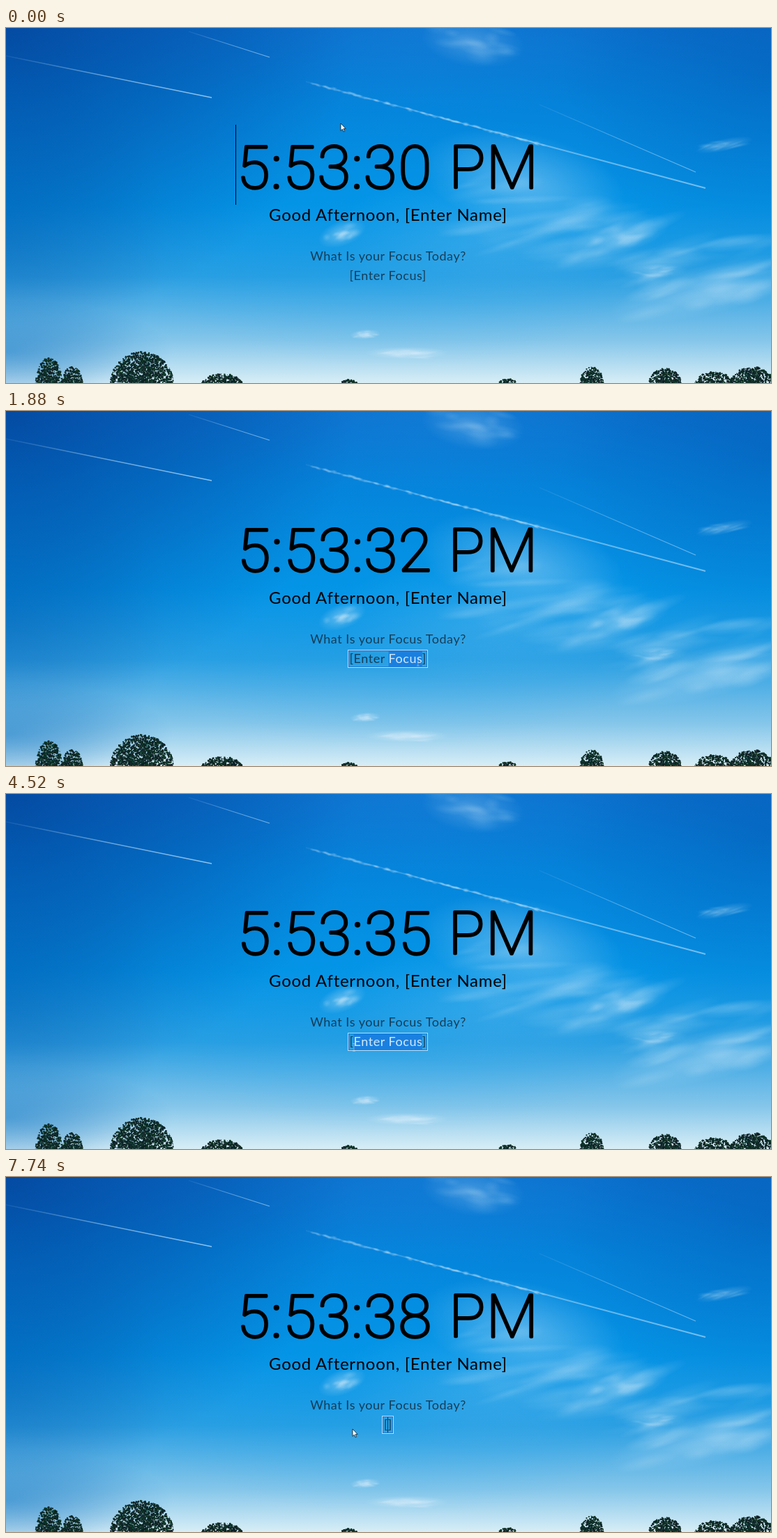
Animation, 1097 px wide and 510 px high, one loop 8 s. Source, as an HTML page with a canvas:

```html
<!DOCTYPE html>
<html lang="en">
<head>
<meta charset="utf-8">
<title>Focus clock</title>
<style>
  html, body { margin: 0; width: 100%; height: 100%; overflow: hidden; background: #0a7fd6; }
  canvas, svg { position: absolute; left: 0; top: 0; width: 1097px; height: 510px; }
  text { text-anchor: middle; font-family: Lato, "Open Sans", sans-serif; letter-spacing: .03em; white-space: pre; }
  #clock {
    font: 100 86px Roboto, Inter, sans-serif; font-variant-numeric: proportional-nums; letter-spacing: 2px;
    stroke: #000; stroke-width: 3.5px; stroke-linejoin: round;
  }
  #hello { font-size: 24px; }
  .small { font-size: 18px; fill: rgba(18, 30, 42, .76); }
  .picked { fill: #d3e8fa; }
</style>
</head>
<body>
<canvas id="sky" width="1097" height="510"></canvas>
<svg viewBox="0 0 1097 510">
  <text id="clock" x="548" y="229.5"></text>
  <rect id="clockCaret" y="139" width="1" height="115"/>
  <text id="hello" x="548" y="277">Good Afternoon, [Enter Name]</text>
  <text class="small" x="548" y="334">What Is your Focus Today?</text>
  <g id="ring" fill="none">
    <rect id="outer" y="343.5" height="25" stroke="#d5eafa" stroke-opacity=".85"/>
    <rect id="inner" y="344.5" height="23" stroke="#1670cf" stroke-opacity=".8"/>
  </g>
  <rect id="mark" y="345" height="22.5" fill="#1a80e0"/>
  <text id="focus" class="small" x="547.7" y="362"><tspan></tspan><tspan class="picked"></tspan><tspan></tspan></text>
  <rect id="caret" y="345" width="1" height="22" fill="#12324e"/>
  <circle id="click" r="9" fill="#cfdc32" fill-opacity=".8"/>
  <path id="beam" d="M-2-5.5h4M0-5.5v11M-2 5.5h4" fill="none" stroke="#d9cfc4" stroke-opacity=".5"/>
  <path id="arrow" d="M0 0V10.5L2.4 8.3 4 12 5.6 11.3 4 7.7H7.2Z" fill="#fff" stroke="#111" stroke-width=".8"/>
</svg>
<script>
const $ = id => document.getElementById(id);
const set = (el, attrs) => { for (const k in attrs) el.setAttribute(k, attrs[k]); };
const show = (el, on) => { el.style.display = on ? '' : 'none'; };
const clamp = (v, lo, hi) => Math.min(hi, Math.max(lo, v));

// ---- backdrop ----
const ctx = $('sky').getContext('2d');
let seed = 7;
const rnd = () => (seed = (seed * 16807) % 2147483647) / 2147483647;
const between = (a, b) => a + (b - a) * rnd();
const spread = () => rnd() + rnd() - 1;

function puff(x, y, rx, ry, deg, alpha, rgb = '215,236,250') {
  ctx.save();
  ctx.translate(x, y);
  ctx.rotate(deg * Math.PI / 180);
  ctx.scale(rx, ry);
  const g = ctx.createRadialGradient(0, 0, 0, 0, 0, 1);
  [1, .5, 0].forEach((k, i) => g.addColorStop(i / 2, `rgba(${rgb},${alpha * k})`));
  ctx.fillStyle = g;
  ctx.fillRect(-1, -1, 2, 2);
  ctx.restore();
}

// a soft body with random wisps along its axis
function cloud(x, y, rx, ry, deg, alpha) {
  puff(x, y, rx, ry, deg, alpha * .7);
  const a = deg * Math.PI / 180;
  for (let i = 0; i < 14; i++) {
    const u = spread() * rx * .8, v = spread() * ry * .8;
    puff(x + u * Math.cos(a) - v * Math.sin(a), y + u * Math.sin(a) + v * Math.cos(a),
      rx * between(.15, .4), Math.max(2, ry * between(.15, .4)), deg + spread() * 14, alpha * .35);
  }
}

function trail(x1, y1, x2, y2, width, alpha) {
  const g = ctx.createLinearGradient(x1, y1, x2, y2);
  g.addColorStop(0, 'rgba(190,225,250,.08)');
  g.addColorStop(.5, `rgba(190,225,250,${alpha * .7})`);
  g.addColorStop(1, `rgba(190,225,250,${alpha})`);
  ctx.strokeStyle = g;
  ctx.lineWidth = width;
  ctx.beginPath();
  ctx.moveTo(x1, y1);
  ctx.lineTo(x2, y2);
  ctx.stroke();
}

// leaf specks, denser toward the heart of the crown
function tree(x, top, half) {
  const h = 514 - top;
  for (let i = 0; i < half * h * .7; i++) {
    const a = between(0, Math.PI), r = rnd() ** .6;
    ctx.fillStyle = `rgb(${between(6, 24) | 0},${between(28, 58) | 0},${between(30, 48) | 0})`;
    ctx.beginPath();
    ctx.arc(x + Math.cos(a) * r * half, 514 - Math.sin(a) * r * h, between(.5, 1.6), 0, 7);
    ctx.fill();
  }
}

function paintSky() {
  const g = ctx.createLinearGradient(0, 0, 0, 510);
  ['#0a70cc', '#0580d8', '#0592e4', '#2b9fe2', '#85c6ea', '#d8eef6']
    .forEach((c, i) => g.addColorStop([0, .2, .5, .7, .88, 1][i], c));
  ctx.fillStyle = g;
  ctx.fillRect(0, 0, 1097, 510);

  // light centre, dark corners
  puff(560, 260, 420, 230, 0, .3, '0,158,240');
  puff(620, 0, 300, 130, 0, .35, '30,140,228');
  puff(0, 0, 500, 420, 0, .6, '0,50,135');
  puff(1097, 60, 300, 260, 0, .3, '0,70,160');
  puff(0, 300, 230, 260, 0, .28, '0,75,160');
  puff(0, 465, 240, 75, 0, .55, '25,125,200');

  // hazy bank falling to the right, then brighter clouds
  puff(740, 220, 150, 70, 12, .38);
  puff(700, 300, 240, 90, 0, .16);
  for (let i = 0; i < 50; i++) {
    const u = rnd();
    puff(660 + u * 420, between(200, 300) + u * 110, between(25, 90), between(5, 16), between(-24, 0), between(.06, .2));
  }
  [[670, 20, 75, 36, 8, .35], [482, 295, 36, 18, -20, .6], [880, 298, 75, 26, -15, .5],
   [930, 350, 48, 11, -3, .45], [1010, 375, 150, 36, -14, .45], [1030, 168, 42, 9, -12, .4],
   [515, 440, 22, 7, -4, .8], [575, 467, 60, 9, 0, .85]].forEach(c => cloud(...c));

  trail(0, 40, 295, 100, 1.4, .75);
  trail(262, 5, 378, 42, 1.3, .6);
  trail(430, 77, 1003, 230, 2, .6);
  trail(765, 110, 989, 207, 1.2, .55);
  for (let i = 0; i < 90; i++) {
    const u = rnd();
    puff(440 + u * 330, 80 + u * 88 + spread() * 2, 5, 2, 15, .3);
  }

  [[62, 474, 20], [95, 486, 15], [195, 465, 46], [310, 497, 30], [492, 505, 13], [720, 504, 14],
   [840, 487, 17], [945, 489, 24], [1015, 494, 28], [1070, 487, 32]].forEach(t => tree(...t));
}

// ---- timeline, in ms ----
const LOOP = 8000, SECOND = 985, BLINK = 390, KEY = 180;
const FOCUS = 1420, PICK = 1570, UNPICK = 2280, DRAG = 3060, DRAG_END = 3210;
const TYPE = 5450, ERASE = 6360, EMPTY = 6900;
const WORD = 'Orhe';

// pointer legs: leave, arrive, x, y
const LEGS = [[0, 0, 480, 137], [370, 820, 548, 396], [820, 1120, 584, 360], [1650, 2120, 598, 361],
  [DRAG, DRAG_END, 495, 361], [3370, 3910, 499, 364], [TYPE, TYPE, 497, 362]];

const blink = (t, since) => t < since || Math.floor((t - since) / BLINK) % 2 === 0;
const keys = (t, since) => clamp(Math.floor((t - since) / KEY) + 1, 0, WORD.length);

function mouseAt(t) {
  let x = 0, y = 0;
  for (const [from, to, nx, ny] of LEGS) {
    if (t < from) break;
    const k = to > from ? clamp((t - from) / (to - from), 0, 1) : 1;
    x += (nx - x) * k;
    y += (ny - y) * k;
  }
  return [x, y];
}

// what the focus line holds: word, selected range, caret index
function lineAt(t) {
  if (t >= TYPE) {
    const word = WORD.slice(0, keys(t, TYPE) - keys(t, ERASE));
    return { word, caret: word.length + 1 };
  }
  const word = 'Enter Focus', end = word.length + 1;
  if (t < PICK) return { word, caret: end - 1 };
  if (t < UNPICK) return { word, from: 7, to: end };
  const k = clamp((t - DRAG) / (DRAG_END - DRAG), 0, 1);
  return { word, from: Math.round(end - k * (end - 1)), to: end, caret: k ? 0 : end };
}

function drawClock(t) {
  const el = $('clock');
  el.textContent = `5:53:${30 + Math.floor((t + 465) / SECOND)} PM`;
  set($('clockCaret'), { x: Math.round(el.getStartPositionOfChar(0).x - 2) });
  show($('clockCaret'), t < FOCUS && blink(t, 0));
}

function drawLine(t) {
  const { word, from = 0, to = 0, caret = 0 } = lineAt(t);
  const text = `[${word}]`, el = $('focus');
  [text.slice(0, from), text.slice(from, to), text.slice(to)]
    .forEach((part, i) => { el.children[i].textContent = part; });
  const charX = i => el.getStartPositionOfChar(i).x;

  const half = Math.round(el.getComputedTextLength() / 2 + 2);
  set($('outer'), { x: 547.5 - half, width: half * 2 });
  set($('inner'), { x: 548.5 - half, width: half * 2 - 2 });
  show($('ring'), t >= FOCUS);

  set($('mark'), { x: charX(from), width: charX(to) - charX(from) });
  set($('caret'), { x: Math.floor(charX(caret)) });
  show($('caret'), t >= FOCUS && caret && blink(t, t < TYPE ? UNPICK : EMPTY));
}

function drawMouse(t) {
  const [x, y] = mouseAt(t);
  const arrow = t <= 370 || t >= TYPE || y > 372;
  ['arrow', 'beam', 'click'].forEach(id => set($(id), { transform: `translate(${x} ${y})` }));
  show($('arrow'), arrow);
  show($('beam'), !arrow);
  show($('click'), (t >= FOCUS && t < 1650) || (t >= 2120 && t < 4370));
}

paintSky();
const start = performance.now();
function frame() {
  const t = (performance.now() - start) % LOOP;
  drawClock(t);
  drawLine(t);
  drawMouse(t);
  requestAnimationFrame(frame);
}
frame();
</script>
</body>
</html>
```
